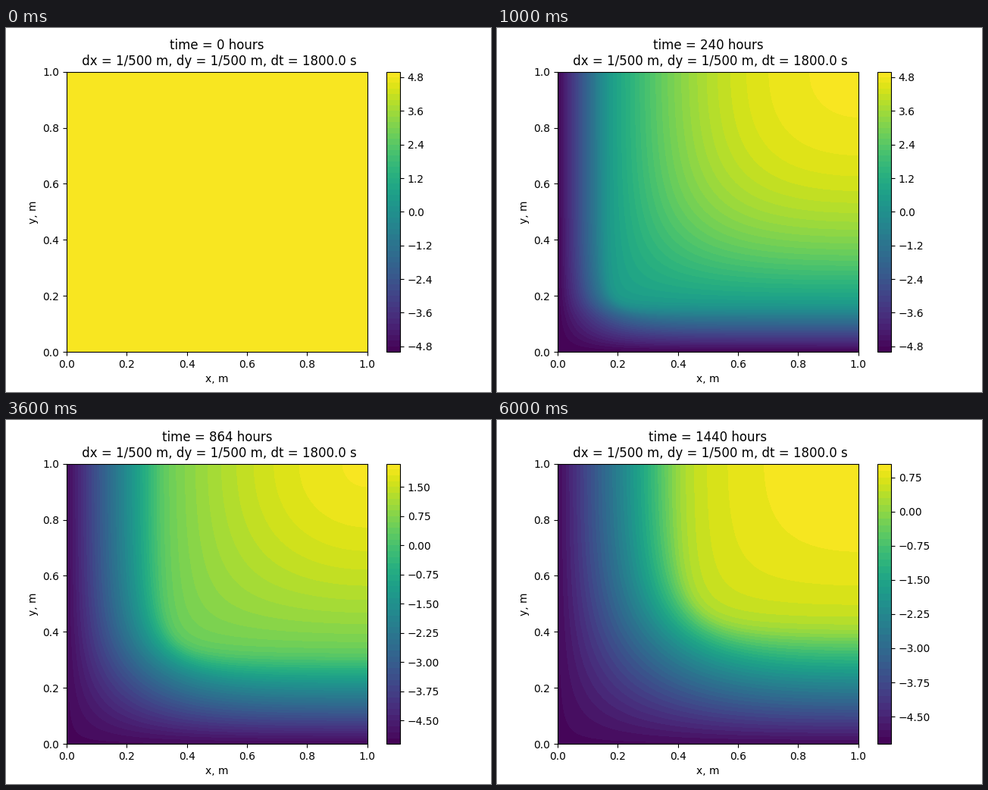
Recreate the animation shown at these times as a matplotlib script. Size 640 by 480 pixels, loop 6200 ms.

```python
import numpy as np
import matplotlib.pyplot as plt
from matplotlib.animation import FuncAnimation

FRAMES, INTERVAL = 31, 200
HOURS = 48            # shown hours per frame
SPAN = 86400.0        # simulated seconds per frame
WALL, START = -5.0, 5.0
LATENT, WIDTH = 3.3e5, 1 / 3
RHO = 1000.0

# Nodes crowd towards the cold walls, where the gradient is steep.
x = np.linspace(0, 1, 101) ** 1.6
h = np.diff(x)[:, None]
vol = np.append(h[:-1] + h[1:], h[-1:], axis=0) / 2


def sweep(T, dt):
    """Implicit heat step along axis 0: cold wall first, insulated end last."""
    s = np.tanh(T / WIDTH)
    cond = 1.4 - 0.8 * s
    cap = RHO * (3150 + 1050 * s + LATENT * (1 - s * s) / (2 * WIDTH))
    g = (cond[1:] + cond[:-1]) / (2 * h)
    mass = cap[1:] * vol / dt
    diag = mass + g
    diag[:-1] += g[1:]
    rhs = mass * T[1:]
    rhs[0] += g[0] * WALL

    for i in range(1, len(g)):
        r = g[i] / diag[i - 1]
        diag[i] -= r * g[i]
        rhs[i] += r * rhs[i - 1]

    out = np.empty_like(T)
    out[0] = WALL
    out[-1] = rhs[-1] / diag[-1]
    for i in range(len(g) - 2, -1, -1):
        out[i + 1] = (rhs[i] + g[i + 1] * out[i + 2]) / diag[i]
    return out


def simulate():
    T = np.full((x.size, x.size), START)
    T[0] = T[:, 0] = WALL
    states = [T]
    for n in range(1, FRAMES):
        steps = 96 if n < 3 else 24
        for _ in range(2 * steps):
            T = sweep(T, SPAN / steps).T
        states.append(np.clip(T, WALL, START))
    return states


states = simulate()
fig = plt.figure(figsize=(6.4, 4.8), dpi=100)


def draw(n):
    fig.clf()
    ax = fig.add_subplot()
    filled = ax.contourf(x, x, states[n], 50, cmap="viridis")
    fig.colorbar(filled, ax=ax)
    ax.set_title(f"time = {n * HOURS} hours\n"
                 " dx = 1/500 m, dy = 1/500 m, dt = 1800.0 s")
    ax.set_xlabel("x, m")
    ax.set_ylabel("y, m")
    return []


anim = FuncAnimation(fig, draw, frames=FRAMES, interval=INTERVAL,
                     repeat=True, repeat_delay=0)
plt.show()
```
